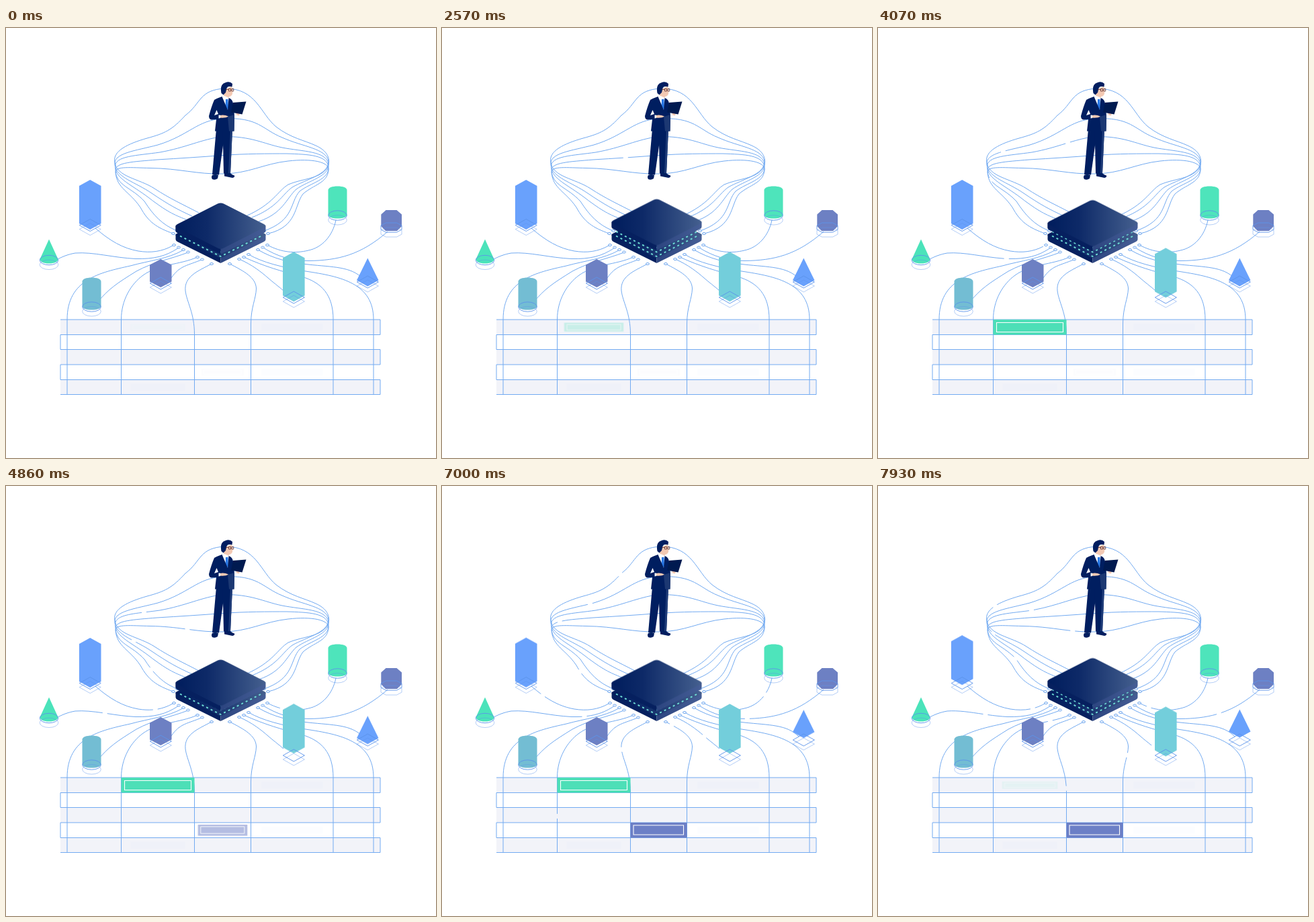
Write an HTML page without scripts that moves like this. It is 640x640 px and loops after 8000 ms.

```html
<!DOCTYPE html>
<html lang="en">
<head>
<meta charset="utf-8">
<title>Data processor</title>
<style>
html, body { margin: 0; width: 100%; height: 100%; overflow: hidden; background: #fff; }
svg { display: block; width: 100vw; height: 100vh; }

.line { fill: none; stroke: #72aaf1; stroke-width: 1; }
.node { fill: #fff; stroke: #6ba4ee; stroke-width: 1; }
.base { fill: none; stroke: #5c93ea; stroke-width: .9; }
.faint { opacity: .5; }

/* A gap runs down the line at --v px/s, first at --s seconds, again 3.3 s later */
.run {
  stroke-dasharray: 3000px 7px calc(var(--v) * 3.3px - 7px) 7px;
  animation: run 8s linear infinite;
}
@keyframes run {
  from { stroke-dashoffset: calc((3000 + var(--v) * (3.3 + var(--s))) * 1px); }
  to { stroke-dashoffset: calc((3000 + var(--v) * (var(--s) - 4.7)) * 1px); }
}

.lid, .rise, .cell { animation: 8s cubic-bezier(.364,0,.636,1) infinite; }
.lid { animation-name: lid; }
.r1 { animation-name: rise1; }
.r2 { animation-name: rise2; }
.r3 { animation-name: rise3; }
@keyframes lid {
  0% { transform: none; }
  37.5% { transform: translateY(-6px); }
  75% { transform: none; animation-timing-function: cubic-bezier(.36,0,.66,.59); }
  100% { transform: translateY(-4.5px); }
}
@keyframes rise1 {
  0%, 30% { transform: none; }
  67.5% { transform: translateY(-10px); }
  80% { transform: translateY(-10px); animation-timing-function: cubic-bezier(.36,0,.7,.55); }
  100% { transform: translateY(-4.5px); }
}
@keyframes rise2 {
  0%, 56.25% { transform: none; }
  93.75%, 100% { transform: translateY(-10px); }
}
@keyframes rise3 {
  0%, 83.1% { transform: none; animation-timing-function: cubic-bezier(.36,0,.7,.5); }
  100% { transform: translateY(-4.2px); }
}

/* Cells rest small and almost clear */
.cell { transform-box: fill-box; transform-origin: center; transform: scale(.75,.46); opacity: .02; }
.c1 { animation-name: cell1; }
.c2 { animation-name: cell2; }
.inset { fill: none; stroke: #fff; stroke-width: 1.1; }
@keyframes cell1 {
  0%, 27.75% { transform: scale(.75,.46); opacity: .02; }
  41.25%, 88.4% { transform: none; opacity: 1; }
  100% { transform: scale(.755,.48); opacity: .07; }
}
@keyframes cell2 {
  0%, 54% { transform: scale(.75,.46); opacity: .02; }
  67.5%, 100% { transform: none; opacity: 1; }
}
</style>
</head>
<body>
<svg viewBox="0 0 640 640">
<defs>
  <linearGradient id="top">
    <stop offset="0" stop-color="#001d5d"/>
    <stop offset=".35" stop-color="#0e2a68"/>
    <stop offset="1" stop-color="#45608f"/>
  </linearGradient>
  <linearGradient id="side">
    <stop offset="0" stop-color="#2c4580"/>
    <stop offset="1" stop-color="#465e96"/>
  </linearGradient>
  <ellipse id="n" class="node" rx="2.5" ry="1.5"/>
  <g id="rhomb" class="base">
    <path d="M0-9 16 0 0 9-16 0Z"/>
    <path class="faint" d="M0-3 16 6 0 15-16 6Z"/>
  </g>
  <g id="ring" class="base">
    <ellipse rx="13.800" ry="7.200"/>
    <ellipse class="faint" cy="6.800" rx="13.800" ry="7.200"/>
  </g>
  <path id="tall" d="M0 0 16.300 9V65L0 74-16.300 65V9Z"/>
  <path id="can" d="M-14 6C-14 2-8 0 0 0S14 2 14 6V42C14 46 8 48 0 48S-14 46-14 42Z"/>
  <path id="oct" d="M-8-7H8L15.500-3V3L8 7H-8L-15.500 3V-3Z"/>
</defs>

<!-- table -->
<path fill="#f2f3f9" d="M81 434H557V456.500H81ZM81 478.500H557V501H81ZM81 523.500H557V545.500H81Z"/>
<path class="line" d="M81 434H557V456.500H81V478.500H557V501H81V523.500H557V545.500H81"/>

<!-- links between person and chip -->
<g class="line">
  <path class="run" style="--v:112;--s:6.35" d="M326 90C287 92 291 112 267 130C247 152 236 157 210 164C182 172 158 183 162 200C165 222 198 224 221 239S262 262 287 275"/>
  <path class="run" style="--v:95;--s:2.58" d="M322 135C285 137 272 160 226 174C192 183 159 186 162 204C165 223 192 229 217 246S255 270 277 280"/>
  <path class="run" style="--v:100;--s:3.7" d="M322 161.500C290 166 268 178 229 185C195 190 161 190 162.500 207C164 225 187 233 213 253S250 278 268 285"/>
  <path class="run" style="--v:87;--s:2.05" d="M322 189.500C290 192 258 194 225 196C190 199 162 200 163 212C164 235 187 237 206 258C219 278 232 293 255 302"/>
  <path class="run" style="--v:87;--s:4.3" d="M322 217C285 218 258 209 215 208.500C185 208 163 205 163 215C165 239 184 243 200 267C212 289 224 297 249 306"/>
  <path d="M326 90C373 90 378 127 402 147C424 164 444 167 461 175C482 184 484 200 477 210C465 225 441 224 420 233C404 243 398 262 357 280"/>
  <path d="M322 135C376 132 381 151 411 163C442 177 476 179 480 198C481 218 447 225 426 237C410 249 404 267 366 282"/>
  <path d="M322 161.500C366 161 382 172 411 178C442 184 476 183 480 202C482 221 450 227 432 240C417 254 412 276 376 288"/>
  <path d="M322 189.500C357 187 390 187 418 187C450 188 478 189 480 207C481 226 454 230 437 243C422 260 430 286 384 302"/>
  <path d="M322 217C361 217 383 202 420 198C455 194 482 199 480 212C478 231 458 233 442 247C429 264 434 296 390 306"/>
</g>

<!-- links to the objects and table columns -->
<g class="line">
  <path class="run" style="--v:36;--s:4.2" d="M248 324C232 333 215 335 197 332C174 328 155 317 133 298"/>
  <path class="run" style="--v:56;--s:2.9" d="M257 327C238 340 220 344 193 343.500C160 342 130 333 103 335C92 337 85 340 78 343.500"/>
  <path d="M264 330.500C240 344 214 346 185 354C140 364 91 374 91 434V545"/>
  <path d="M271 334C245 344 220 348 194 362C167 379 152 388 135 410"/>
  <path class="run" style="--v:80;--s:4.3" d="M285 341C257 353 228 351 204 368C186 381 171.500 405 171.500 434V545"/>
  <path d="M292 344.500C270 354 259 353 246 372"/>
  <path class="run" style="--v:64;--s:6.1" d="M306 351C285 362 265 370 267 391C269 408 280.500 424 280.500 456V545"/>
  <path class="run" style="--v:64;--s:6.9" d="M333 351C354 362 372 371 372.500 388C372 403 364.500 416 364.500 440V545"/>
  <path class="run" style="--v:27;--s:5.2" d="M347 344C366 352 381 364 390 372C398 379 405 384 413 391"/>
  <path d="M354 341C385 355 410 362 440 370C470 379 487 397 487 434V545"/>
  <path d="M361 337C382 349 410 356 446 362C499 370 547 380 547 434V545"/>
  <path d="M375 330C399 344 422 349 450 352C487 356 514 355 531 373"/>
  <path class="run" style="--v:58;--s:5.75" d="M382 326.500C404 340 423 346 450 346.500C494 346 528 338 568 303"/>
  <path class="run" style="--v:36;--s:4.3" d="M389 323C410 334 430 336 450 331C470 327 486 310 491 286"/>
</g>

<!-- cells -->
<g class="cell c1">
  <path fill="#4ddfb7" d="M171.500 434H280.500V456.500H171.500Z"/>
  <path class="inset" d="M176.500 438.500H275.500V452.500H176.500Z"/>
</g>
<g class="cell c2">
  <path fill="#6c7fc6" d="M280.500 501H364.500V523.500H280.500Z"/>
  <path class="inset" d="M285 505H359.500V519H285Z"/>
</g>
<g fill="#69a1fc">
  <path class="cell" d="M364.500 434H487V456.500H364.500Z"/>
  <path class="cell" d="M364.500 501H487V523.500H364.500Z"/>
  <path class="cell" d="M171.500 523.500H280.500V545.500H171.500Z"/>
</g>

<!-- line ends -->
<use href="#n" x="249" y="306"/><use href="#n" x="255" y="302"/>
<use href="#n" x="384" y="302"/><use href="#n" x="390" y="306"/>
<use href="#n" x="250" y="323"/><use href="#n" x="257" y="326.500"/>
<use href="#n" x="264" y="330"/><use href="#n" x="271" y="333.500"/>
<use href="#n" x="285" y="341"/><use href="#n" x="292" y="344.500"/>
<use href="#n" x="306" y="351"/><use href="#n" x="333" y="351"/>
<use href="#n" x="347" y="344"/><use href="#n" x="354" y="341"/>
<use href="#n" x="361" y="337"/><use href="#n" x="375" y="330"/>
<use href="#n" x="382" y="326.500"/><use href="#n" x="389" y="323"/>

<!-- chip -->
<path fill="#06205f" d="M252.500 307V314.500Q252.500 316.500 255 318L319.500 350V341Z"/>
<path fill="url(#side)" d="M386.500 307V314.500Q386.500 316.500 384 318L319.500 350V341Z"/>
<path fill="url(#top)" d="M315 277.500Q319.500 275 324 277.500L385 306Q388 308 385 310L323 341Q319.500 343 316 341L254 310Q251 308 254 306Z"/>
<g fill="none" stroke="#70dfd6" stroke-width="1.9" stroke-dasharray="3 4.300">
  <path id="dots" d="M259 309.500 319.500 340 380 309.500"/>
  <use href="#dots" y="-6.500"/>
  <use href="#dots" y="-13"/>
</g>
<g class="lid">
  <path fill="#06205f" d="M252.300 294V301.500Q252.300 303.500 255 305L316 335Q318 336.200 319.500 336.200V326Z"/>
  <path fill="url(#side)" d="M386.500 294V301.500Q386.500 303.500 384 305L323 335Q321 336.200 319.500 336.200V326Z"/>
  <path fill="url(#top)" d="M315 261.600Q319.500 259.300 324 261.600L384 292Q388.500 294.500 384 297L324 327.500Q319.500 330 315 327.500L255 297Q250.500 294.500 255 292Z"/>
</g>

<!-- objects -->
<g class="rise r3"><use href="#tall" x="125.200" y="226" fill="#69a1fc"/></g>
<use href="#rhomb" x="125.200" y="293.500"/>

<path fill="#4be3ba" d="M64 314.500 77.500 344C77.500 348 72 350.500 64 350.500S50.500 348 50.500 344Z"/>
<use href="#ring" x="64" y="345.500"/>

<use href="#can" x="127.500" y="371.500" fill="#73bdd3"/>
<use href="#ring" x="127.500" y="415"/>

<path fill="#6d80c3" d="M230.300 344 246.500 352.500V377.500L230.300 386 214 377.500V352.500Z"/>
<use href="#rhomb" x="230.300" y="380"/>

<use href="#can" x="493.500" y="235.500" fill="#4ee4bb"/>
<use href="#ring" x="493.500" y="279"/>

<path fill="#6d80c3" d="M565.500 271H581.500L589 277.500V295L582 302H565L558.300 295V277.500Z"/>
<g class="base">
  <use href="#oct" x="573.500" y="297"/>
  <use href="#oct" class="faint" x="573.500" y="304"/>
</g>

<g class="rise r1"><use href="#tall" x="428.300" y="333.300" fill="#73cedb"/></g>
<use href="#rhomb" x="428.300" y="401"/>

<g class="rise r2"><path fill="#69a1fc" d="M538.300 342.500 554.500 375.500 538.300 384.500 522 375.500Z"/></g>
<use href="#rhomb" x="538.300" y="378"/>

<!-- person -->
<g fill="#001e60">
  <path d="M307 219Q311 217 316 219L315 224Q311 227 307 225Q305 222 307 219Z"/>
  <path d="M325 215 333 214.500Q335 218 340 219.500Q341 222 337 223L325 220.500Z"/>
  <path d="M313 150H326.500L317 218.500 307 218Z"/>
  <path d="M322.500 150H337L334 216 324 216.500Z"/>
  <path fill="#1f3c78" d="M334 152H337L334 216H331Z"/>
  <path fill="#f3c9b3" d="M324 92 335.500 87Q338 92 337 98Q335.500 102 332 102L331 108H324Z"/>
  <path d="M320.500 97Q318 84 326 81.500Q333 78.500 337 83L336.500 87.500Q330 86 328.500 89.500L327 96 323.500 99.500Z"/>
  <path fill="none" stroke="#5b2c2a" stroke-width=".8" d="M327 91.500H331.500M331.500 90.500H334.500V94H331.500ZM336 90.500H338.700V94H336Z"/>
  <path fill="#fff" d="M321 102 325 101 332 104 332 122 326 119Z"/>
  <path fill="#2878e6" d="M327 106H330.500L331 119 329 122 326.500 117Z"/>
  <path d="M321.500 102Q313 105 310 107Q306 116 302 131Q302 136 306 136.500L313 136 311 153.500H339.500L340 130 338 112Q337 106 331.500 104L330 122Z"/>
  <path fill="#1c3872" d="M330 132 340 129 339.500 153.500H332Z"/>
  <path fill="#fff" d="M313.500 122 316 128 310 130Z"/>
  <path fill="#f3c9b3" d="M318 130Q325 128.500 331 131.500Q327 134.500 318 133.500Z"/>
  <path fill="#fff" d="M316.500 129.500 319 129.700V134L316.500 134.500Z"/>
  <path fill="#f3c9b3" d="M342 125 348 126.500 347 130.500 343 129.500Z"/>
  <path fill="#001a50" d="M338 111 357.500 109.500 351.500 128.500 335 125.500Z"/>
</g>
</svg>
</body>
</html>
```
